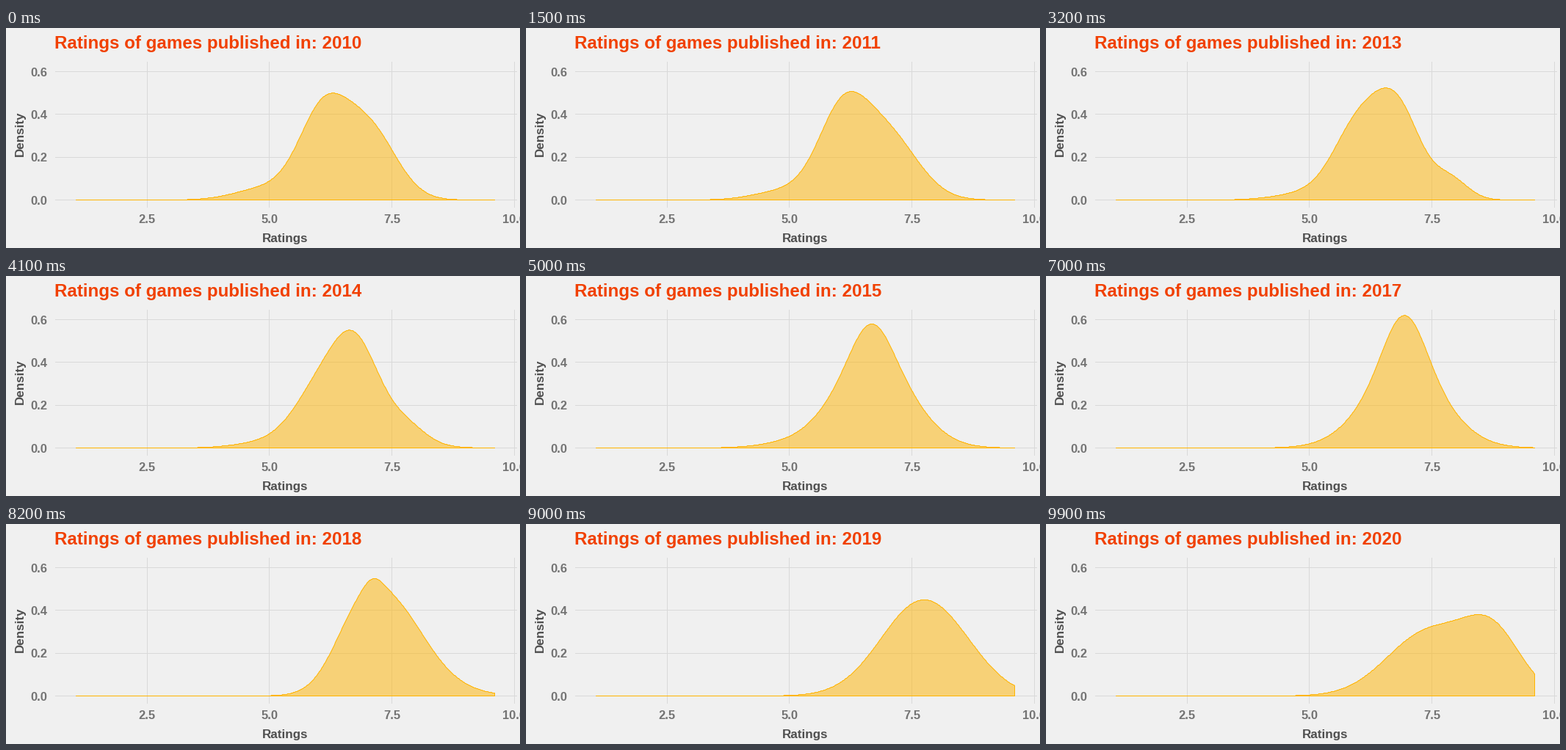
Write a matplotlib script that moves like this. It is 700x300 px and loops after 10 s.

```python
import numpy as np
import matplotlib.pyplot as plt
from matplotlib.animation import FuncAnimation

W, H, DPI = 700, 300, 100
FRAMES, INTERVAL = 100, 100
FIRST_YEAR, LAST_YEAR = 2010, 2020
PX = 72 / DPI                      # one pixel in points

BG, GRID = "#f0f0f0", "#d9d9d9"
TITLE, LABEL, TICK = "#f14000", "#4f4f4f", "#737373"
GOLD = "#ffb400"

LEFT, RIGHT, TOP, BOTTOM = 66.6, 694.5, 46, 243.5
X0, X_UNIT = 25.2, 66.65           # pixels at rating 0, pixels per rating
Y0, Y_UNIT = 234.2, 292            # pixels at density 0, pixels per density

# Each density is a sum of bells: (peak, mean, spread)
BELLS = {
    2010: [(.40, 6.10, .50), (.32, 7.05, .55)],
    2011.5: [(.38, 6.08, .50), (.30, 7.00, .62)],
    2013.2: [(.32, 5.97, .50), (.41, 6.80, .48), (.09, 7.90, .35)],
    2015: [(.43, 6.70, .78), (.15, 6.67, .38)],
    2017.1: [(.37, 6.95, .80), (.25, 6.95, .41)],
    2018: [(.28, 6.75, .50), (.40, 7.45, .65), (.06, 7.12, .20)],
    2019: [(.46, 7.75, .85)],
    2020: [(.30, 7.45, .85), (.265, 8.76, .58)],
}

XS = np.arange(95, 666)
RATINGS = (XS + .5 - X0) / X_UNIT


def bell(peak, mean, spread):
    return peak * np.exp(-((RATINGS - mean) / spread) ** 2 / 2)


def density(year):
    # The low-rating tail fades as the years go on
    tail = max(0, .053 - .0075 * (year - FIRST_YEAR))
    return sum(bell(*b) for b in BELLS[year]) + bell(tail, 4.9, .6)


KEYS = list(BELLS)
DENSITIES = np.array([density(year) for year in KEYS])


def outline(time):
    """Closed shape on whole pixels, blended between key years."""
    k = min(np.searchsorted(KEYS, time, side="right"), len(KEYS) - 1)
    u = (time - KEYS[k - 1]) / (KEYS[k] - KEYS[k - 1])
    d = (1 - u) * DENSITIES[k - 1] + u * DENSITIES[k]
    base = int(Y0) + .5
    x = XS + .5
    xs = np.concatenate([[x[0]], x, [x[-1], x[0]]])
    ys = np.concatenate([[base], base - np.round(d * Y_UNIT), [base, base]])
    return xs, ys


fig = plt.figure(figsize=(W / DPI, H / DPI), dpi=DPI, facecolor=BG)
ax = fig.add_axes([0, 0, 1, 1])
ax.set(xlim=(0, W), ylim=(H, 0))
ax.axis("off")


def write(x, y, s, size, color, **kw):
    return ax.text(x, y, s, fontsize=size * PX, color=color, weight="bold",
                   family="Liberation Sans", **kw)


def grid(xs, ys):
    ax.plot(xs, ys, color=GRID, lw=PX, zorder=1)


for v in (0, .2, .4, .6):
    y = Y0 - Y_UNIT * v
    grid([LEFT, RIGHT], [y, y])
    write(56, y + 6.5, f"{v:.1f}", 16.5, TICK, ha="right")
for v in (2.5, 5, 7.5, 10):
    x = X0 + X_UNIT * v
    grid([x, x], [TOP, BOTTOM])
    write(x + .3, 266, f"{v:.1f}", 16.5, TICK, ha="center")

write(380.5, 292, "Ratings", 17, LABEL, ha="center")
write(27, 144, "Density", 17, LABEL, rotation=90, ha="right", va="center")
title = write(66, 28, "", 24.1, TITLE)

area, = ax.fill([0, 1, 1], [0, 0, 1], fc=GOLD, alpha=.5, lw=0, zorder=2)
edge, = ax.plot([], [], color=GOLD, lw=PX, zorder=3, snap=False)


def draw(n):
    time = FIRST_YEAR + n * (LAST_YEAR - FIRST_YEAR) / (FRAMES - 1)
    xs, ys = outline(time)
    area.set_xy(np.column_stack([xs, ys]))
    edge.set_data(xs, ys)
    title.set_text(f"Ratings of games published in: {int(time)}")
    return area, edge, title


anim = FuncAnimation(fig, draw, frames=FRAMES, interval=INTERVAL, repeat=True,
                     repeat_delay=0)
plt.show()
```
